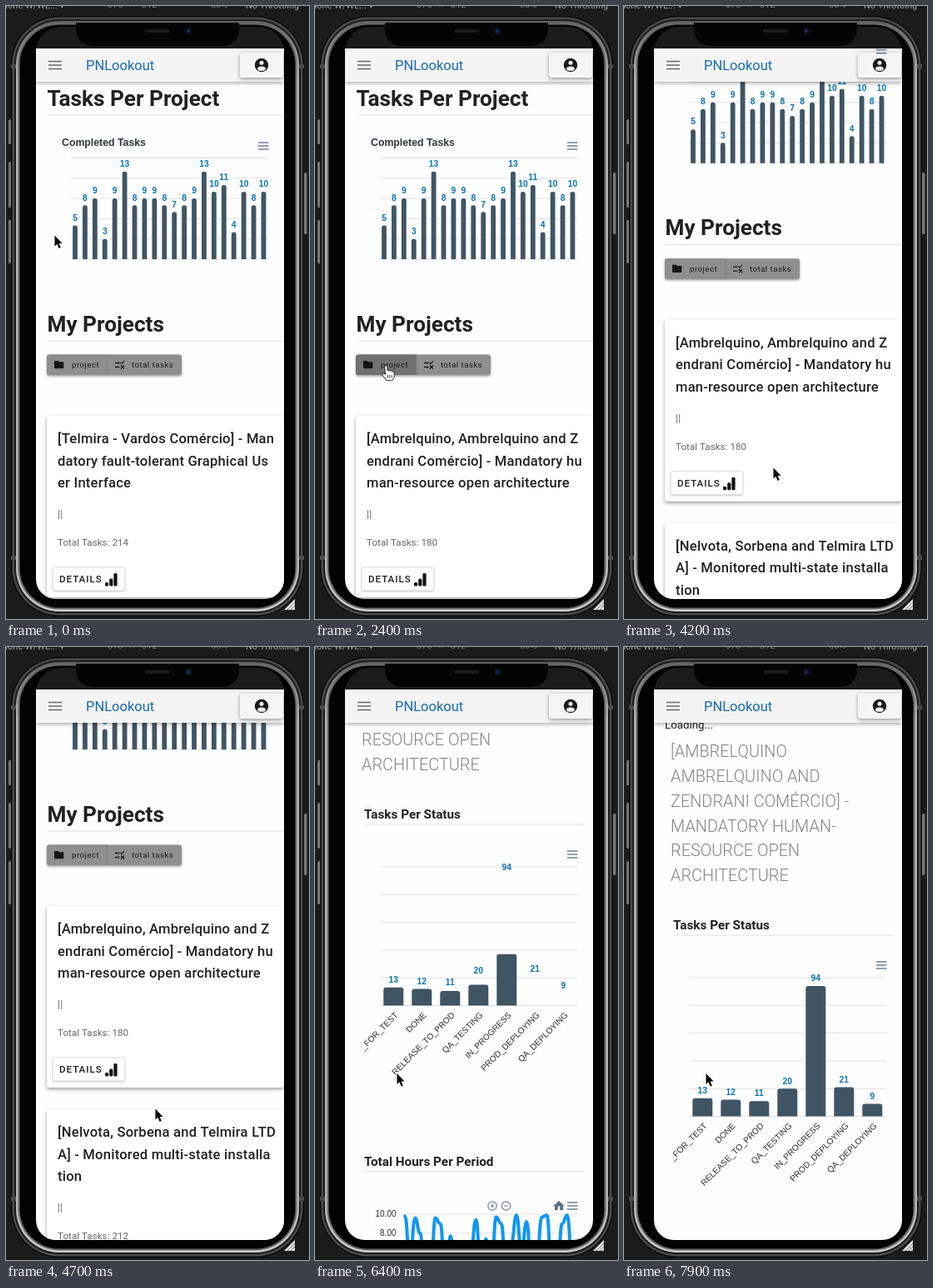
Recreate the animation shown at these times as an HTML page with a canvas. Size 364 by 736 pixels, loop 8 s.

```html
<!DOCTYPE html>
<html lang="en">
<head>
<meta charset="utf-8">
<title>Task dashboard</title>
<style>
html, body { margin: 0; width: 100%; height: 100%; overflow: hidden; background: #1b1b1b; }
canvas { display: block; width: 364px; height: 736px; }
</style>
</head>
<body>
<canvas id="stage"></canvas>
<script>
const W = 364, H = 736, LOOP = 8000, STEP = 100;
const canvas = document.getElementById('stage');
const ctx = canvas.getContext('2d');
const dpr = window.devicePixelRatio || 1;
canvas.width = W * dpr;
canvas.height = H * dpr;

const ROBOTO = 'Roboto, sans-serif';
const ARIAL = '"Liberation Sans", Arial, sans-serif';
const SLATE = '#405564', BLUE = '#0c73b5', INK = '#212121', GRID = '#e0e0e0', TOOL = '#6e8192';

const clamp = x => Math.min(1, Math.max(0, x));
const lerp = (a, b, k) => a + (b - a) * k;
const phase = (t, from, to) => clamp((t - from) / (to - from));
const smooth = k => k * k * (3 - 2 * k);
const easeOut = (k, p = 2) => 1 - Math.pow(1 - k, p);

// ---------- drawing helpers ----------
function text(str, x, y, font, color, { spacing = 0, align = 'left' } = {}) {
  ctx.font = font;
  ctx.fillStyle = color;
  ctx.textAlign = align;
  ctx.letterSpacing = spacing + 'px';
  ctx.fillText(str, x, y);
}

function box(x, y, w, h, r, fill, stroke, lw = 1) {
  ctx.beginPath();
  ctx.roundRect(x, y, w, h, r);
  if (fill) { ctx.fillStyle = fill; ctx.fill(); }
  if (stroke) { ctx.strokeStyle = stroke; ctx.lineWidth = lw; ctx.stroke(); }
}

function raised(x, y, w, h, r, fill, alpha = 0.35, blur = 4, dy = 1.5) {
  ctx.save();
  ctx.shadowColor = `rgba(0,0,0,${alpha})`;
  ctx.shadowBlur = blur * dpr;
  ctx.shadowOffsetY = dy * dpr;
  box(x, y, w, h, r, fill);
  ctx.restore();
}

function path(points, color, lw, close) {
  ctx.beginPath();
  points.forEach(([x, y], i) => i ? ctx.lineTo(x, y) : ctx.moveTo(x, y));
  if (close) ctx.closePath();
  ctx.lineWidth = lw;
  ctx.strokeStyle = color;
  ctx.stroke();
}

function hline(x1, x2, y, color = GRID, lw = 1) {
  path([[x1, y], [x2, y]], color, lw);
}

function dot(x, y, r, fill) {
  ctx.beginPath();
  ctx.arc(x, y, r, 0, Math.PI * 2);
  ctx.fillStyle = fill;
  ctx.fill();
}

function menuIcon(x, y, w, gap, color, lw) {
  for (const d of [-gap, 0, gap]) hline(x, x + w, y + d, color, lw);
}

function bar(cx, base, w, h, r) {
  if (h > 0.3) box(cx - w / 2, base - h, w, h, [Math.min(r, h), Math.min(r, h), 0, 0], SLATE);
}

function barLabel(n, cx, top) {
  text(n, cx, top - 5.7, `bold 10.3px ${ARIAL}`, BLUE, { align: 'center' });
}

// ---------- phone ----------
function drawDesk() {
  ctx.fillStyle = '#1b1b1b';
  ctx.fillRect(0, 0, W, H);
  const font = `11px ${ROBOTO}`;
  text('hone W/WL... ▾', -4, 3, font, '#a0a0a0');
  text('375   ×   812', 122, 2, font, '#777');
  text('50%', 246, 2, font, '#777');
  text('No Throttling', 288, 3, font, '#a0a0a0');
}

function drawPhone() {
  for (const [x, y, h] of [[3, 136, 30], [3, 187, 55], [3, 257, 52], [358, 200, 74]])
    box(x, y, 3.5, h, 1.5, '#777');

  const silver = ctx.createLinearGradient(0, 12, 0, 734);
  silver.addColorStop(0, '#5a5a5a');
  silver.addColorStop(0.1, '#b4b4b4');
  silver.addColorStop(0.9, '#b4b4b4');
  silver.addColorStop(1, '#d0d0d0');
  // rim rings from the outside in: inset and colour
  const rings = [[0, '#0c0c0c'], [1.5, '#4a4a4a'], [4, '#1c1c1c'], [6, silver], [8.5, '#6a6a6a'], [10.5, '#020202']];
  for (const [d, color] of rings)
    box(6 + d, 12 + d, 352 - 2 * d, 721 - 2 * d, 58 - d, color);
  for (const y of [70, 660]) {
    box(6, y, 6, 5, 0, '#4c4c4c');
    box(352, y, 6, 5, 0, '#4c4c4c');
  }

  box(36, 25, 298, 30, [34, 34, 0, 0], '#1b1b1b');
  box(84, 20, 196, 28, [0, 0, 20, 20], '#040404');
  box(167, 28, 30, 4, 2, '#1b1b1d');
  dot(219, 30, 4.5, '#0c0f1c');
  dot(219, 30, 2, '#1d2a55');

  ctx.beginPath();
  ctx.moveTo(347, 712);
  ctx.lineTo(347, 725);
  ctx.lineTo(334, 725);
  ctx.fillStyle = '#e4e4e4';
  ctx.fill();
  path([[338, 725], [347, 716]], '#777', 1);
  path([[342, 725], [347, 720]], '#777', 1);
}

// ---------- shared page parts ----------
function drawHeader() {
  raised(36, 45, 298, 46, 0, '#f4f4f4', 0.35, 5, 1.5);
  menuIcon(51, 71, 16, 4.5, '#686868', 1.6);
  text('PNLookout', 96, 77, `16.5px ${ROBOTO}`, '#1a6bb3');
  raised(281, 56, 52, 30, 3, '#f5f5f5', 0.4, 4, 1.5);
  dot(307, 71, 8.2, '#1a1a1a');
  dot(307, 68.2, 2.5, '#f5f5f5');
  ctx.beginPath();
  ctx.ellipse(307, 75.2, 4.8, 2.6, 0, 0, Math.PI * 2);
  ctx.fill();
}

function chartMenu(y) {
  menuIcon(303, y, 12.5, 4, TOOL, 1.6);
}

// ---------- project list ----------
const CARDS = {
  first: [['[Telmira - Vardos Comércio] - Man', 'datory fault-tolerant Graphical Us', 'er Interface'], 214],
  lowest: [['[Ambrelquino, Ambrelquino and Z', 'endrani Comércio] - Mandatory hu', 'man-resource open architecture'], 180],
  next: [['[Nelvota, Sorbena and Telmira LTD', 'A] - Monitored multi-state installa', 'tion'], 212]
};
const DONE = [5, 8, 9, 3, 9, 13, 8, 9, 9, 8, 7, 8, 9, 13, 10, 11, 4, 10, 8, 10];

function drawCard(top, [lines, total]) {
  raised(49, top, 285, 218, 3, '#fff', 0.38, 4, 2);
  lines.forEach((s, i) =>
    text(s, 62, top + 33 + i * 26.5, `500 16.6px ${ROBOTO}`, INK, { spacing: 0.21 }));
  text('||', 62, top + 122, `12px ${ROBOTO}`, '#666', { spacing: 0.4 });
  text('Total Tasks: ' + total, 62, top + 156, `11.6px ${ROBOTO}`, '#666', { spacing: 0.04 });
  raised(56, top + 182, 87, 28, 3, '#fff', 0.25, 2, 1);
  box(56, top + 182, 87, 28, 3, null, '#dcdcdc');
  text('DETAILS', 64, top + 200, `500 11.6px ${ROBOTO}`, '#1d1d1d', { spacing: 1 });
  [4.5, 9, 15.5].forEach((h, i) => box(119 + i * 5.2, top + 204.5 - h, 4.2, h, 1.5, '#111'));
}

function drawFilters(shade) {
  raised(49, 418.5, 162, 24.5, 3, '#8f8f8f', 0.4, 3, 1.5);
  box(49, 418.5, 73, 24.5, [3, 0, 0, 3], shade);
  path([[122, 419], [122, 443]], '#808080', 1);
  box(58, 426, 5.5, 4, 1, '#151515');
  box(58, 427.3, 11.3, 8, 1, '#151515');
  const font = `9.6px ${ROBOTO}`;
  text('project', 79, 434.3, font, '#1c1c1c', { spacing: 0.5 });
  text('total tasks', 151, 434.3, font, '#1c1c1c', { spacing: 0.5 });
  hline(131, 136.5, 428.5, '#151515', 1.3);
  hline(131, 136.5, 433.5, '#151515', 1.3);
  path([[137.5, 428], [139, 429.5], [142, 426.3]], '#151515', 1.2);
  path([[138, 431.5], [142, 435.5]], '#151515', 1.2);
  path([[142, 431.5], [138, 435.5]], '#151515', 1.2);
}

function drawList(t, scroll) {
  ctx.save();
  ctx.translate(0, -scroll);
  const heading = `bold 26.2px ${ROBOTO}`;
  text('Tasks Per Project', 49.5, 120, heading, INK);
  hline(50, 334, 131);
  text('Completed Tasks', 67, 168, `bold 12.3px ${ARIAL}`, '#2e383d');
  for (let i = 0; i < 6; i++) hline(78, 315, 182.5 + i * 24.3);
  DONE.forEach((n, i) => {
    const cx = 83 + i * 11.92, h = n * 8.1;
    bar(cx, 304, 5.8, h, 2.6);
    barLabel(n, cx, 304 - h);
  });
  text('My Projects', 49.5, 390.5, heading, INK);
  hline(50, 334, 402);
  const shade = t >= 2100 && t < 3100 ? '#717171' : t >= 1700 && t < 2100 ? '#848484' : '#8f8f8f';
  drawFilters(shade);
  drawCard(492, t < 2200 ? CARDS.first : CARDS.lowest);
  drawCard(736, CARDS.next);
  ctx.restore();
  drawHeader();
  chartMenu(168 - scroll);
}

// ---------- project details ----------
const STATUS = [['READY_FOR_TEST', 13], ['DONE', 12], ['RELEASE_TO_PROD', 11], ['QA_TESTING', 20],
  ['IN_PROGRESS', 94], ['PROD_DEPLOYING', 21], ['QA_DEPLOYING', 9]];
const TITLE = ['[AMBRELQUINO', 'AMBRELQUINO AND', 'ZENDRANI COMÉRCIO] -', 'MANDATORY HUMAN-',
  'RESOURCE OPEN', 'ARCHITECTURE'];
const HOURS = [9.8, 5, 9.6, 8, 2, 2, 9.6, 9, 2, 7.7, 3, 4, 7, 6, 9.4, 4, 7.4, 3, 9.7, 9,
  3, 7, 9.9, 6, 9.2, 4, 5, 9.7, 9.9, 3, 3, 9, 9.9, 5];

function drawStatusChart(t) {
  const base = 611.5;
  for (let i = 0; i < 6; i++) hline(78, 315, base - i * 33.3);
  ctx.save();
  ctx.beginPath();
  ctx.rect(59, 430, 265, 320);
  ctx.clip();
  STATUS.forEach(([name, n], i) => {
    const cx = 94.3 + i * 34, full = n * 1.665, start = 5800 + i * 125;
    bar(cx, base, 24, full * easeOut(phase(t, start, start + 450)), 3);
    barLabel(n, cx, base - full);
    ctx.save();
    ctx.translate(cx + 4, base + 10);
    ctx.rotate(-Math.PI / 4);
    text(name, 0, 3, `10.2px ${ARIAL}`, '#2b2f31', { align: 'right' });
    ctx.restore();
  });
  ctx.restore();
}

function drawHoursChart(t) {
  const top = 862, unit = 11.4, grow = easeOut(phase(t, 5700, 6300));
  [['10.00', 0], ['8.00', 22.8]].forEach(([s, dy]) => {
    hline(104, 315, top + dy);
    text(s, 97.5, top + dy + 3, `10px ${ARIAL}`, '#2b2f31', { align: 'right' });
  });
  for (const x of [213, 229.5]) {
    ctx.beginPath();
    ctx.arc(x, 852, 5.2, 0, Math.PI * 2);
    ctx.lineWidth = 1.2;
    ctx.strokeStyle = TOOL;
    ctx.stroke();
    hline(x - 2.6, x + 2.6, 852, TOOL, 1.2);
  }
  path([[213, 849.4], [213, 854.6]], TOOL, 1.2);
  ctx.fillStyle = '#5b6f80';
  ctx.beginPath();
  ctx.moveTo(286, 852.5);
  ctx.lineTo(293, 846);
  ctx.lineTo(300, 852.5);
  ctx.fill();
  ctx.fillRect(288, 852, 3.8, 5);
  ctx.fillRect(294.2, 852, 3.8, 5);

  ctx.save();
  ctx.lineWidth = 4;
  ctx.lineJoin = ctx.lineCap = 'round';
  ctx.strokeStyle = '#1297f0';
  ctx.beginPath();
  const step = 201 / (HOURS.length - 1);
  HOURS.forEach((v, i) => {
    const x = 108 + i * step, y = top + (10 - v * grow) * unit;
    if (!i) return ctx.moveTo(x, y);
    const prev = top + (10 - HOURS[i - 1] * grow) * unit;
    ctx.bezierCurveTo(x - step / 2, prev, x - step / 2, y, x, y);
  });
  ctx.stroke();
  ctx.restore();
}

function drawDetails(t, scroll) {
  ctx.save();
  ctx.translate(0, -scroll);
  text('Loading...', 49, 145.5, `13.3px ${ROBOTO}`, INK);
  TITLE.forEach((s, i) => text(s, 56, 180 + i * 29.85, `300 19.9px ${ROBOTO}`, '#858585'));
  const heading = `bold 15.3px ${ROBOTO}`;
  text('Tasks Per Status', 59, 387, heading, INK);
  hline(59, 324, 394);
  drawStatusChart(t);
  text('Total Hours Per Period', 59, 804, heading, INK);
  hline(59, 324, 810.5);
  drawHoursChart(t);
  ctx.restore();
  chartMenu(430 - scroll);
  chartMenu(852 - scroll);
  drawHeader();
}

// ---------- pointer ----------
const MOVES = [[600, 1500, 81, 405], [1500, 1800, 85, 432], [2900, 3600, 179, 554], [4700, 5500, 98, 511.5]];

function pointerAt(t) {
  let x = 58, y = 275;
  for (const [from, to, tx, ty] of MOVES) {
    const k = smooth(phase(t, from, to));
    x = lerp(x, tx, k);
    y = lerp(y, ty, k);
  }
  return [x, y];
}

function pointerKind(t, x, y) {
  if (t < 3800 && y > 418 && y < 443 && x < 211) return 'hand';
  if (t < 3800 && y > 507) return 'beam';
  if (t > 4800 && t < 5700 && x < 143 && y < 521) return 'hand';
  return 'arrow';
}

function shape(points, fill, stroke) {
  path(points, stroke, 1.6, true);
  ctx.fillStyle = fill;
  ctx.fill();
}

function drawPointer(t) {
  const [x, y] = pointerAt(t), kind = pointerKind(t, x, y);
  ctx.save();
  ctx.translate(x, y);
  ctx.lineJoin = 'round';
  if (kind === 'arrow') {
    shape([[0.5, 0.5], [0.5, 13.5], [3.4, 10.8], [5.6, 16], [7.8, 15], [5.6, 10], [9.6, 10]], '#000', '#fff');
  } else if (kind === 'hand') {
    shape([[-1, 0], [1, 0], [2, 6], [4, 5.5], [5.5, 6.5], [7.5, 6.5], [9, 7.5], [10, 9], [10, 13],
      [8, 17], [1, 17], [-4, 10.5], [-3, 9], [0, 11]], '#fff', '#111');
    for (const fx of [2.4, 4.8, 7.2]) path([[fx, 11], [fx, 14.5]], '#111', 0.8);
  } else {
    const beam = [[[-3, -8], [0, -6.5], [3, -8]], [[0, -6.5], [0, 8.5]], [[-3, 10], [0, 8.5], [3, 10]], [[-2, 4], [2, 4]]];
    for (const p of beam) path(p, '#fff', 3);
    for (const p of beam) path(p, '#111', 1.3);
  }
  ctx.restore();
}

// ---------- loop ----------
function draw(t) {
  ctx.setTransform(dpr, 0, 0, dpr, 0, 0);
  drawDesk();
  drawPhone();
  ctx.save();
  ctx.beginPath();
  ctx.roundRect(36, 51, 298, 661, [0, 0, 24, 24]);
  ctx.clip();
  ctx.fillStyle = '#fefefe';
  ctx.fillRect(36, 51, 298, 661);
  const down = 181 * easeOut(phase(t, 3750, 4700), 1.58);
  const up = 133 * smooth(phase(t, 7400, 7900));
  if (t < 5700) drawList(t, down);
  else drawDetails(t, down - up);
  drawPointer(t);
  ctx.restore();
}

const origin = performance.now();
function tick() {
  const t = (performance.now() - origin) % LOOP;
  draw(Math.floor(t / STEP) * STEP);
  requestAnimationFrame(tick);
}
tick();
</script>
</body>
</html>
```
